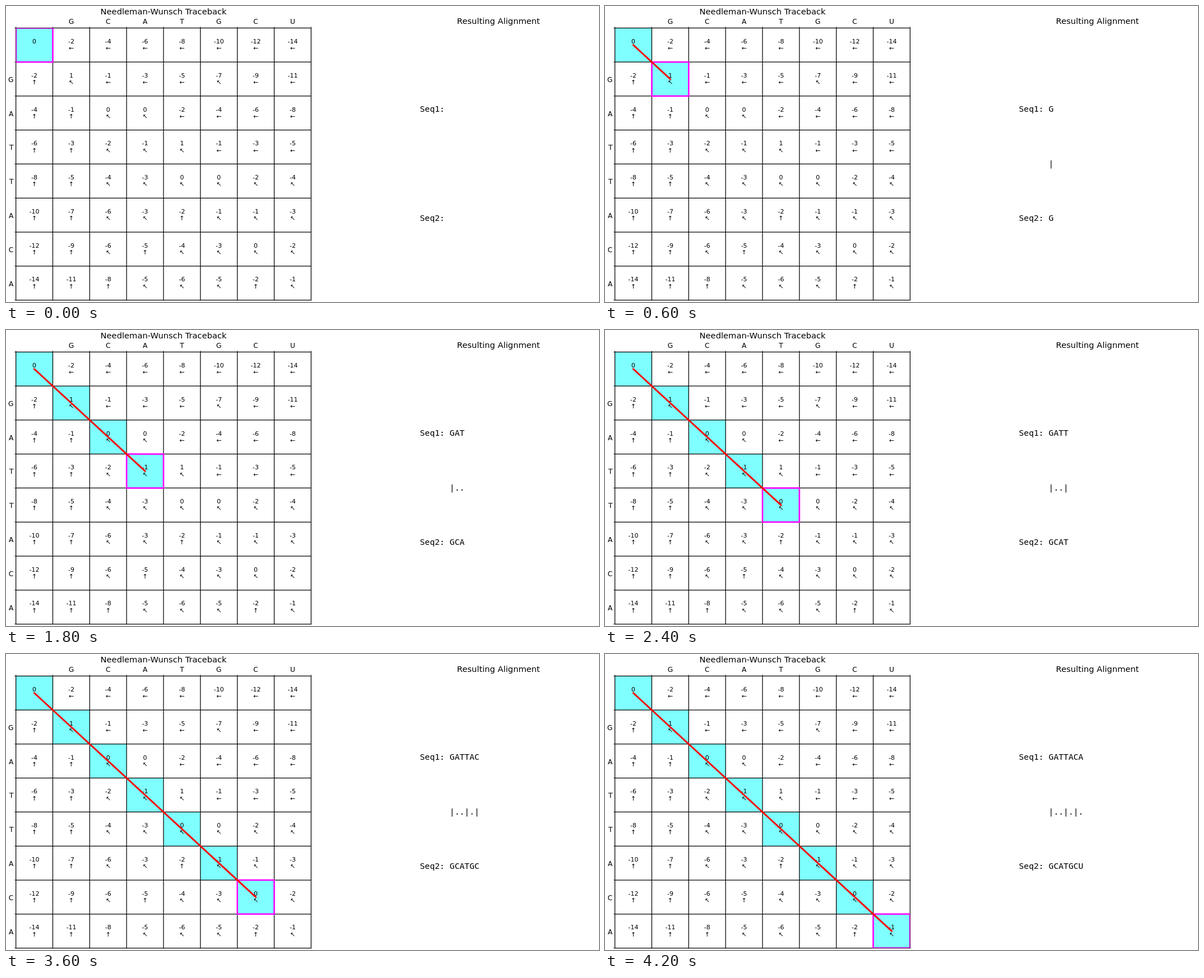
Animation of 1058 by 529 pixels, one loop 7.8 s. Source, as an HTML page with a canvas:

```html
<!DOCTYPE html>
<html lang="en">
<head>
<meta charset="utf-8">
<title>Needleman-Wunsch Traceback</title>
<style>
html, body { margin: 0; width: 100%; height: 100%; overflow: hidden; background: #fff; }
canvas { display: block; }
</style>
</head>
<body>
<canvas id="stage" width="1058" height="529"></canvas>
<script>
const ctx = document.getElementById("stage").getContext("2d");
const LOOP = 7800, STEP = 600;
const SEQ1 = "GATTACA", SEQ2 = "GCATGCU";
const N = SEQ1.length + 1;
const X0 = 17.65, Y0 = 39.4, CW = 65.84, CH = 60.77;
const SANS = '"DejaVu Sans", sans-serif';
const MONO = '"DejaVu Sans Mono", monospace';
const MATCH = 1, MISMATCH = -1, GAP = -2;

const colX = j => X0 + j * CW;
const rowY = i => Y0 + i * CH;

// Score table with the direction each best score came from
function buildTable() {
  const table = [];
  for (let i = 0; i < N; i++) {
    table.push([]);
    for (let j = 0; j < N; j++) {
      const options = [];
      if (i && j) {
        const s = SEQ1[i - 1] === SEQ2[j - 1] ? MATCH : MISMATCH;
        options.push({ score: table[i - 1][j - 1].score + s, arrow: "↖" });
      }
      if (i) options.push({ score: table[i - 1][j].score + GAP, arrow: "↑" });
      if (j) options.push({ score: table[i][j - 1].score + GAP, arrow: "←" });
      const start = { score: 0, arrow: "" };
      table[i].push(options.length
        ? options.reduce((a, b) => (b.score > a.score ? b : a))
        : start);
    }
  }
  return table;
}
const table = buildTable();

function text(str, x, y, size, align = "center", family = SANS) {
  ctx.font = `${size}px ${family}`;
  ctx.textAlign = align;
  ctx.fillStyle = "#000";
  ctx.fillText(str, x, y);
}

function line(x1, y1, x2, y2, width, color = "#000") {
  ctx.lineWidth = width;
  ctx.strokeStyle = color;
  ctx.beginPath();
  ctx.moveTo(x1, y1);
  ctx.lineTo(x2, y2);
  ctx.stroke();
}

function drawGrid() {
  const right = colX(N), bottom = rowY(N);
  ctx.lineCap = "square";
  for (let k = 0; k <= N; k++) {
    line(colX(k), Y0, colX(k), bottom, 1.25);
    line(X0, rowY(k), right, rowY(k), 1.25);
  }
  ctx.lineCap = "butt";
  for (let k = 0; k <= N; k++) {
    line(colX(k), Y0 - 2.5, colX(k), Y0, 0.8);
    line(X0 - 2.5, rowY(k), X0, rowY(k), 0.8);
  }
}

function drawLabels() {
  text("Needleman-Wunsch Traceback", 281.1, 15.2, 14.69);
  text("Resulting Alignment", 878.6, 32.1, 14.69);
  for (let k = 1; k < N; k++) {
    text(SEQ2[k - 1], colX(k + 0.5), 32.4, 12.25);
    text(SEQ1[k - 1], 13.4, rowY(k + 0.5) + 5.4, 12.25, "right");
  }
}

function drawScores() {
  table.forEach((row, i) => row.forEach((cell, j) => {
    const x = colX(j + 0.5), y = rowY(i + 0.5);
    text(cell.score, x, y - 2.7, 11.02);
    text(cell.arrow, x, y + 9.5, 11.02);
  }));
}

function drawHead(k) {
  ctx.save();
  ctx.beginPath();
  ctx.rect(X0, Y0, N * CW, N * CH);
  ctx.clip();
  ctx.lineWidth = 2.6;
  ctx.strokeStyle = "#f0f";
  ctx.strokeRect(colX(k), rowY(k), CW, CH);
  ctx.restore();
}

function drawAlignment(count) {
  const a = SEQ1.slice(0, count), b = SEQ2.slice(0, count);
  const marks = [...a].map((c, k) => (c === b[k] ? "|" : ".")).join("");
  const rows = ["Seq1: " + a, " ".repeat(6) + marks, "Seq2: " + b];
  rows.forEach((row, k) => text(row, 738.5, 189.3 + k * 97.2, 14.69, "left", MONO));
}

function draw(time) {
  const step = Math.min(N - 1, Math.floor((time % LOOP) / STEP));
  ctx.fillStyle = "#fff";
  ctx.fillRect(0, 0, 1058, 529);
  ctx.fillStyle = "#7fffff";
  for (let k = 0; k <= step; k++) ctx.fillRect(colX(k), rowY(k), CW, CH);
  drawGrid();
  drawHead(step);
  drawLabels();
  drawScores();
  if (step) {
    ctx.lineCap = "square";
    line(colX(0.5), rowY(0.5), colX(step + 0.5), rowY(step + 0.5), 3, "#f00");
  }
  drawAlignment(step);
}

function tick() {
  draw(performance.now());
  requestAnimationFrame(tick);
}
tick();
</script>
</body>
</html>
```
